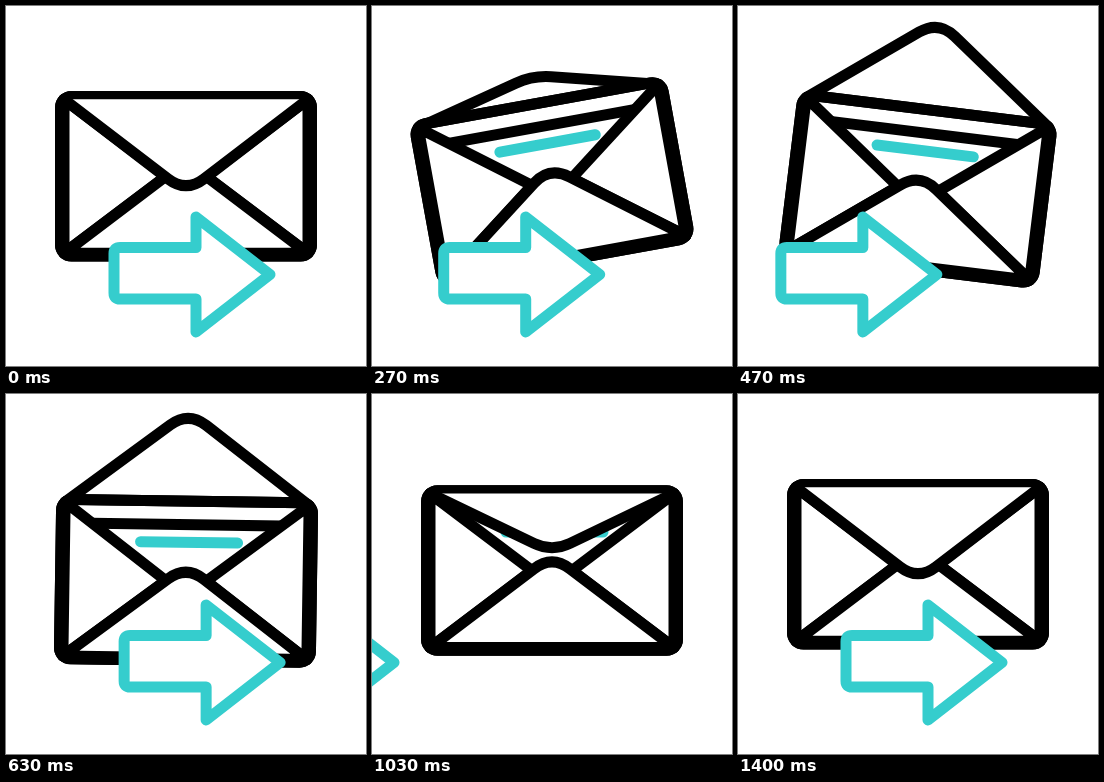
Write an HTML page that moves like this. It is 360x360 px and loops after 1.67 s.

```html
<!DOCTYPE html>
<html lang="en">
<head>
<meta charset="utf-8">
<title>Send mail</title>
<style>
  html, body { margin: 0; width: 100%; height: 100%; overflow: hidden; background: #fff; }
  svg { display: block; width: 100%; height: 100%; }
  path, rect { fill: #fff; stroke: #000; stroke-width: 11; stroke-linejoin: round; stroke-linecap: round; }
  .line { fill: none; }
  .teal { stroke: #35cdcd; }
</style>
</head>
<body>
<svg viewBox="0 0 360 360">
  <g id="envelope">
    <path id="flapBack"/>
    <rect x="-125.5" y="-79.75" width="251" height="159.5" rx="11"/>
    <path d="M-95-56.25H95V0H-95Z"/>
    <path class="teal line" d="M-46-38.5H51"/>
    <path d="M-122-77L-20 .2L-122 77ZM122-77L20 .2L122 77Z"/>
    <path d="M-122 77L-18-1.7Q0-15.4 18-1.7L122 77Z"/>
    <rect class="line" x="-125.5" y="-79.75" width="251" height="159.5" rx="11"/>
    <path id="flapFront"/>
  </g>
  <path id="arrow" class="teal" d="M114 241.5H190V211L264 268.5L190 326V293H114Q108 293 108 287V247.5Q108 241.5 114 241.5Z"/>
</svg>
<script>
const LOOP = 1670, FPS = 30;
const [envelope, flapBack, flapFront, arrow] =
  ['envelope', 'flapBack', 'flapFront', 'arrow'].map(id => document.getElementById(id));

const smooth = u => u * u * (3 - 2 * u);
const easeOut = u => u * (2 - u);

// Each key is [frame, value, easing towards this key].
function track(keys, f) {
  const i = keys.findIndex(key => key[0] > f);
  if (i < 0) return keys[keys.length - 1][1];
  const [f0, v0] = keys[i - 1], [f1, v1, ease = smooth] = keys[i];
  return v0 + (v1 - v0) * ease((f - f0) / (f1 - f0));
}

const drop = [[0, 0], [21, 17], [38, 0]];
const tilt = [[0, 0], [8, -10.3], [14, 7], [22, -2], [29, 0]];
const flapSlope = [[0, .765], [13, -.757], [25, -.757], [33.3, .765]];
const arrowX = [[0, 0], [15, -66], [29, 318], [30, -288, () => 0], [42, 0, easeOut]];

function flapPath(slope) {
  const y = x => -77 + slope * x;
  return `M-122-77L-18 ${y(104)}Q0 ${y(122)} 18 ${y(104)}L122-77`;
}

function draw(now) {
  const f = Math.floor(now % LOOP / 1000 * FPS + .15);
  const slope = track(flapSlope, f), d = flapPath(slope);
  envelope.setAttribute('transform', `translate(180 ${170.25 + track(drop, f)}) rotate(${track(tilt, f)})`);
  flapBack.setAttribute('d', slope < 0 ? d : '');
  flapFront.setAttribute('d', slope < 0 ? '' : d);
  arrow.setAttribute('transform', `translate(${track(arrowX, f)} 0)`);
}

let start;
function tick(now) {
  start ??= now;
  draw(now - start);
  requestAnimationFrame(tick);
}
draw(0);
requestAnimationFrame(tick);
</script>
</body>
</html>
```
